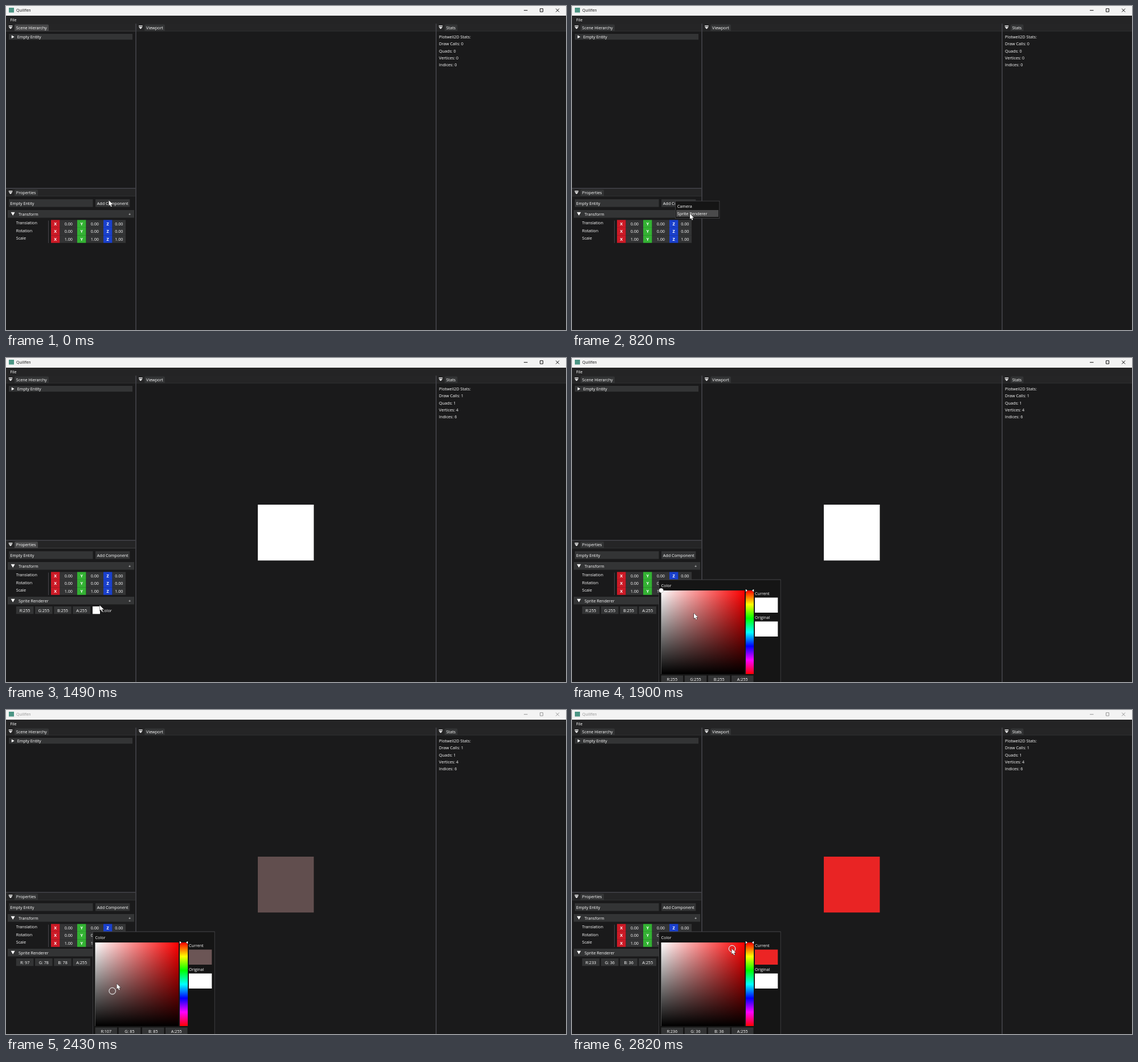
An HTML page with a canvas for the animation above (2840 ms loop, 983 by 570 pixels).

```html
<!DOCTYPE html>
<html lang="en">
<head>
<meta charset="utf-8">
<title>Scene editor</title>
<style>
html, body { margin: 0; width: 100%; height: 100%; overflow: hidden; background: #1a1a1b; }
canvas { display: block; }
</style>
</head>
<body>
<canvas id="stage" width="983" height="570"></canvas>
<script>
const ctx = document.getElementById('stage').getContext('2d');
const LOOP = 2840;
const BG = '#1a1a1b', BAR = '#252526', FRAME = '#333435', ACTIVE = '#474748', LINE = '#45454b';
const PICK = { x: 156.5, y: 409, size: 147 };

// start: ms, mouse: pointer tip, pick / used: [red, green = blue] in the picker and on the sprite
const steps = [
  { start: 0, mouse: [180.5, 342], focus: 'scene' },
  { start: 130, mouse: [180.5, 342], focus: 'props' },
  { start: 260, mouse: [180.5, 342], menu: true },
  { start: 550, mouse: [185, 345], menu: true },
  { start: 700, mouse: [196, 352], menu: true, hover: 0 },
  { start: 820, mouse: [207, 365.5], menu: true, hover: 1 },
  { start: 1120, mouse: [207, 365.5], focus: 'props', sprite: true },
  { start: 1240, mouse: [201, 380], focus: 'props', sprite: true },
  { start: 1370, mouse: [180, 416], focus: 'props', sprite: true },
  { start: 1490, mouse: [164.5, 435], focus: 'props', sprite: true },
  { start: 1630, mouse: [163, 438], focus: 'props', sprite: true, tip: true },
  { start: 1760, mouse: [162, 439], focus: 'props', sprite: true, tip: true },
  { start: 1900, mouse: [214, 449], sprite: true, picker: true },
  { start: 2030, mouse: [243, 473], drag: true, pick: [163, 74], used: [172, 82] },
  { start: 2160, mouse: [223, 507], drag: true, pick: [96, 46], used: [110, 49] },
  { start: 2290, mouse: [183, 510], drag: true, pick: [76, 58], used: [74, 54] },
  { start: 2430, mouse: [194.5, 481.5], drag: true, pick: [107, 85], used: [97, 78] },
  { start: 2560, mouse: [232, 452], drag: true, pick: [173, 91], used: [167, 92] },
  { start: 2680, mouse: [268, 427], drag: true, pick: [220, 59], used: [216, 63] },
  { start: 2820, mouse: [280.5, 420], drag: true, pick: [236, 36], used: [233, 36] }
];

const rgb = ([r, g]) => `rgb(${r},${g},${g})`;

function box(x1, y1, x2, y2, fill, radius = 0) {
  ctx.fillStyle = fill;
  ctx.beginPath();
  ctx.roundRect(x1, y1, x2 - x1, y2 - y1, radius);
  ctx.fill();
}

function text(str, x, y, { align = 'left', color = '#fff', weight = 400, size = 7.2 } = {}) {
  ctx.font = `${weight} ${size}px "Open Sans", "Noto Sans", sans-serif`;
  ctx.textAlign = align;
  ctx.fillStyle = color;
  ctx.fillText(str, x, y + 2.6);
}

function shape(d, x, y, fill, stroke) {
  const path = new Path2D(d);
  ctx.save();
  ctx.translate(x, y);
  if (stroke) {
    ctx.strokeStyle = stroke;
    ctx.lineWidth = 1;
    ctx.stroke(path);
  }
  if (fill) {
    ctx.fillStyle = fill;
    ctx.fill(path);
  }
  ctx.restore();
}

function panel(x1, y1, x2, y2) {
  box(x1, y1, x2, y2, '#47474b');
  box(x1 + 0.8, y1 + 0.8, x2 - 0.8, y2 - 0.8, '#151515');
}

function field(str, x1, x2, y1, y2) {
  box(x1, y1, x2, y2, FRAME);
  text(str, (x1 + x2) / 2, (y1 + y2) / 2 + 0.3, { align: 'center' });
}

function tabBar(label, x, right, y, tabWidth, focused) {
  const color = focused ? ACTIVE : FRAME;
  box(x, y, right, y + 13.5, BAR);
  box(x, y + 12.8, right, y + 13.6, color);
  box(x + 15, y + 1.5, x + 15 + tabWidth, y + 13, color, [2, 2, 0, 0]);
  shape('M0 0H6.6V1.3H0ZM0 2.5H6.6L3.3 6Z', x + 4.7, y + 3.6, '#fff');
  text(label, x + 17.8, y + 7);
}

function header(label, y) {
  box(3, y, 225, y + 13.4, FRAME);
  shape('M0 0H7L3.5 6Z', 8.6, y + 3.7, '#fff');
  text(label, 22, y + 7);
  text('+', 217, y + 7, { align: 'center' });
}

function colorFields(color, xs, width, y1, y2) {
  const values = [color[0], color[1], color[1], 255];
  values.forEach((v, i) =>
    field('RGBA'[i] + ':' + String(v).padStart(3), xs[i], xs[i] + width, y1, y2));
}

function titleBar(faded) {
  const ink = faded ? '#969696' : '#111';
  box(0, 0, 983, 17, '#f3f3f3');
  box(5, 3, 14, 11.5, '#4b9584');
  text('Quillfen', 18, 7.5, { color: ink, size: 7 });
  shape('M909 7.7H915.5M937.5 4.7H942.5V10.2H937.5ZM965.2 4.7L971 10.5M971 4.7L965.2 10.5', 0, 0, null, ink);
  box(0, 17, 983, 31, '#242425');
  text('File', 7.2, 24.3);
}

function transform() {
  header('Transform', 359);
  ['Translation', 'Rotation', 'Scale'].forEach((name, row) => {
    const y = 376.4 + row * 13.45;
    text(name, 17.7, 381.5 + row * 13.45);
    ['#cc1a26', '#33b233', '#1a40cc'].forEach((color, axis) => {
      const x = 79 + axis * 46;
      box(x, y, x + 15.6, y + 13.45, color);
      text('XYZ'[axis], x + 7.7, y + 7, { align: 'center', weight: 700 });
      field(row < 2 ? '0.00' : '1.00', x + 15.6, x + (axis < 2 ? 46 : 46 * 0.85 + 7.5 - 7.5 + 0) , y, y + 13.45);
    });
  });
  box(74, 377.5, 75, 417, LINE);
}

function picker(color, drag) {
  const { x, y, size } = PICK;
  panel(152, 389.6, 366.6, 572);
  text('Color', 156.5, 400);

  const fade = (x1, y1, x2, y2, stops) => {
    const g = ctx.createLinearGradient(x1, y1, x2, y2);
    stops.forEach((c, i) => g.addColorStop(i / (stops.length - 1), c));
    return g;
  };
  box(x, y, x + size - 0.5, y + size, fade(x, 0, x + size, 0, ['#fff', '#f00']));
  box(x, y, x + size - 0.5, y + size, fade(0, y, 0, y + size, ['rgba(0,0,0,0)', '#000']));
  box(305, y, 319, y + size, fade(0, y, 0, y + size, ['#f00', '#ff0', '#0f0', '#0ff', '#00f', '#f0f', '#f00']));
  shape('M0 -2.6L3.2 0L0 2.6Z', 304.8, y, '#fff', '#000');
  shape('M0 -2.6L-3.2 0L0 2.6Z', 319.2, y, '#fff', '#000');

  text('Current', 321, 414.5);
  box(321, 421.5, 361.3, 448, rgb(color));
  text('Original', 321, 456.5);
  box(321, 463.5, 361.3, 490, '#fff');
  colorFields(color, [156.5, 197.7, 239, 280], 38.5, 558.5, 572);

  const cx = x + size * (1 - color[1] / color[0]);
  const cy = y + size * (1 - color[0] / 255);
  const radius = drag ? 5.7 : 3.4;
  const ring = (r, stroke, width) => {
    ctx.beginPath();
    ctx.arc(cx, cy, r, 0, 7);
    ctx.strokeStyle = stroke;
    ctx.lineWidth = width;
    ctx.stroke();
  };
  ctx.beginPath();
  ctx.arc(cx, cy, radius, 0, 7);
  ctx.fillStyle = rgb(color);
  ctx.fill();
  ring(radius + 0.6, '#808080', 0.6);
  ring(radius, '#fff', 1);
}

function tooltip() {
  panel(172, 441, 315, 483);
  box(176.5, 445.5, 209.5, 478.5, '#fff');
  text('#FFFFFFFF', 214, 451);
  text('R:255, G:255, B:255, A:255', 214, 462);
  text('(1.000, 1.000, 1.000, 1.000)', 214, 473);
}

function menu(hover) {
  panel(181, 342.8, 259.3, 374);
  if (hover >= 0) box(183, 346.6 + hover * 12.3, 257, 358.6 + hover * 12.3, '#4a4a4b');
  text('Camera', 184.7, 352.7);
  text('Sprite Renderer', 184.7, 365);
}

function draw(s) {
  const sprite = s.sprite || s.drag;
  const used = s.used || [255, 255];
  box(0, 0, 983, 570, BG);
  titleBar(s.drag);

  tabBar('Scene Hierarchy', 0, 227, 31, 60, s.focus === 'scene');
  tabBar('Viewport', 228.3, 754, 31, 35.5, false);
  tabBar('Stats', 755, 983, 31, 22.5, false);
  tabBar('Properties', 0, 227, 321.5, 41, s.focus === 'props');
  box(227.2, 31, 228.8, 570, LINE);
  box(754.2, 31, 755.8, 570, LINE);
  box(0, 320, 227.2, 321.5, LINE);

  box(5, 49, 222, 59.3, FRAME);
  shape('M0 0L4.8 2.8L0 5.6Z', 9.8, 51.4, '#fff');
  text('Empty Entity', 19.7, 54.5);

  const counts = sprite ? [1, 1, 4, 6] : [0, 0, 0, 0];
  text('Plotwell2D Stats:', 760, 54.5);
  ['Draw Calls', 'Quads', 'Vertices', 'Indices'].forEach((name, i) =>
    text(`${name}: ${counts[i]}`, 760, 66.8 + i * 12.3));

  box(5, 340, 152.5, 353.4, FRAME);
  text('Empty Entity', 7.3, 347);
  field('Add Component', 157, 217.3, 340, 353.4);
  transform();

  if (sprite) {
    box(442, 258, 540.3, 356.2, rgb(used));
    header('Sprite Renderer', 420);
    colorFields(used, [17.8, 51, 84.2, 117.3], 30.6, 437, 450.3);
    box(152, 437, 165, 450.3, rgb(used));
    text('Color', 167.7, 444);
  }
  if (s.menu) menu(s.hover);
  if (s.tip) tooltip();
  if (s.picker || s.drag) picker(s.pick || [255, 255], s.drag);
  shape('M0 0V9.6L2.2 7.6L3.7 11.2L5.3 10.5L3.8 7H6.9Z', ...s.mouse, '#fff', '#111');
}

let begin;
function tick(now) {
  begin ??= now;
  const t = (now - begin) % LOOP;
  draw(steps.findLast(s => s.start <= t));
  requestAnimationFrame(tick);
}
draw(steps[0]);
requestAnimationFrame(tick);
</script>
</body>
</html>
```
